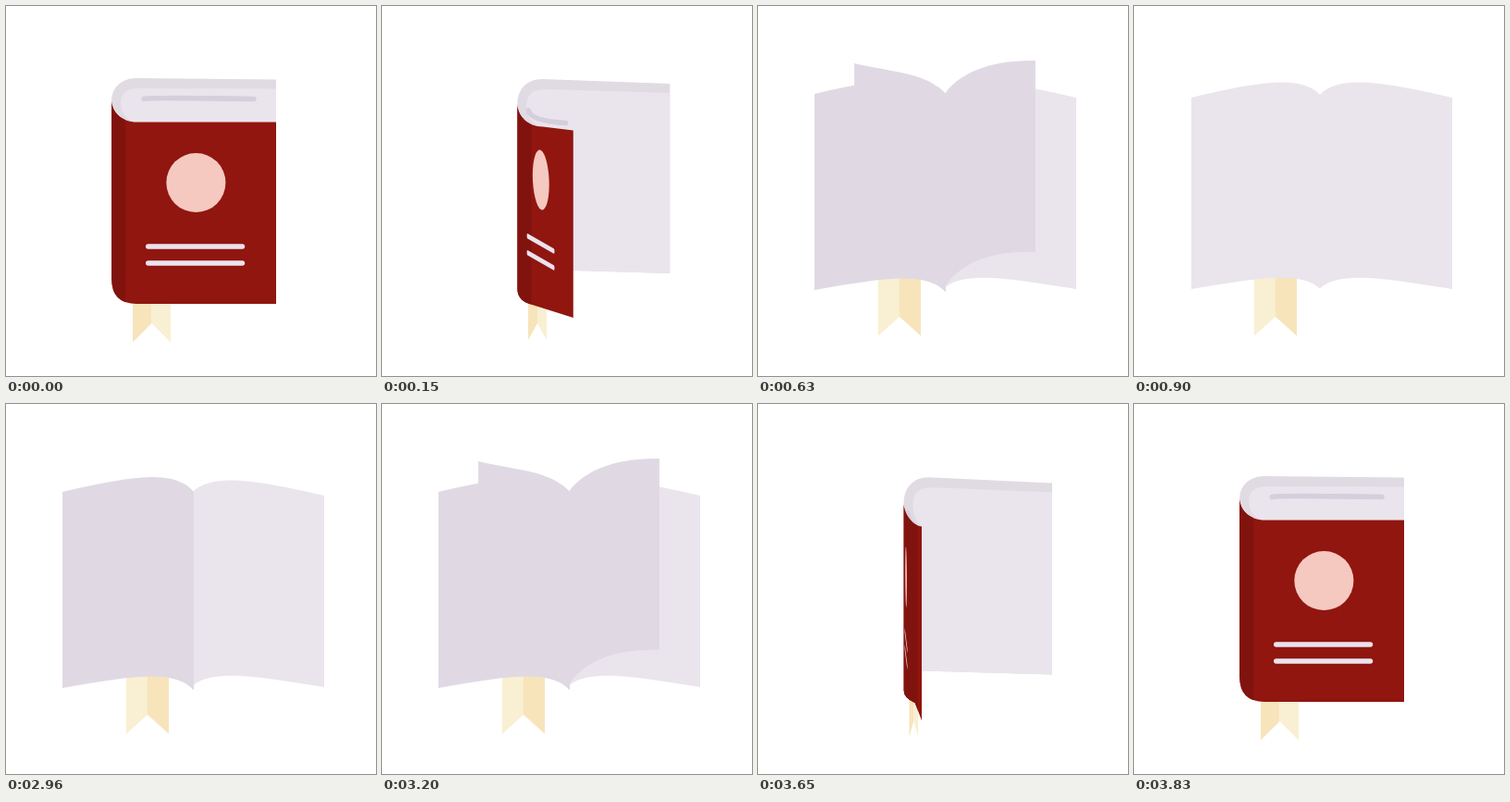
Animation, 400 px wide and 400 px high, one loop 4860 ms. Source, as an HTML page with a canvas:

```html
<!DOCTYPE html>
<html lang="en">
<head>
<meta charset="utf-8">
<title>Opening book</title>
<style>
  html, body { margin: 0; height: 100%; overflow: hidden; background: #fff; }
  canvas { display: block; width: 400px; height: 400px; }
</style>
</head>
<body>
<canvas id="stage" width="400" height="400"></canvas>
<script>
const ctx = document.getElementById('stage').getContext('2d');

const LOOP = 4860, STEP = 30, OPENED = 900, CLOSED_AGAIN = 3830;
const TURN_TIME = 360, LEAVES = 4, FIRST_LEAF = 150, LEAF_GAP = 120;
const HALF_TURN = 0.371;      // progress at which the half-open pose is reached
const PAGE = '#eae5ec', LEAF = '#e0d9e4', BLOCK = '#e0dbe3', MARK = '#d5cedc';
const RED = '#90160f', SPINE_RED = '#81130e', PINK = '#f5c8c0';
const RIBBON_DARK = '#f7e4bb', RIBBON_LIGHT = '#f9efd2';

const ease = k => (1 - Math.cos(Math.PI * Math.min(1, Math.max(0, k)))) / 2;

// Parabola through the closed, half-open and open values
function through(closed, half, open, e) {
  const h = HALF_TURN;
  return closed * (e - h) * (e - 1) / h
       + half * e * (e - 1) / (h * (h - 1))
       + open * e * (e - h) / (1 - h);
}

function fill(color) {
  ctx.fillStyle = color;
  ctx.fill();
}

function stroke(color, width) {
  ctx.strokeStyle = color;
  ctx.lineWidth = width;
  ctx.stroke();
}

// A curved page hinged at the gutter: angle 0 lies right, PI lies left.
// settle (0..1) swells the page slightly as it lands.
function drawPage(color, angle, { gutter = 201, width = 1, drop = 0, settle = 0 } = {}) {
  const c = Math.cos(angle), s = Math.max(0, Math.sin(angle)) ** 1.3;
  const hingeX = gutter + 2 * settle, hingeY = 96 - settle;
  const lift = hingeY - 3 * settle;
  const x1 = hingeX + 21 * c * width, y1 = lift - 22;
  const x2 = hingeX + 67 * c * width, y2 = lift - 14 - (25.5 + 17 * c) * s + drop / 2;
  const tipX = hingeX + (141 + 2 * c - 4 * s + 3 * settle) * c * width;
  const tipY = lift + 3 - (60 + 4 * c) * s + drop;
  const height = 207 + 5 * settle, bend = 212 - 9 * s + 4 * settle;

  ctx.beginPath();
  ctx.moveTo(hingeX, hingeY);
  ctx.bezierCurveTo(x1, y1, x2, y2, tipX, tipY);
  ctx.lineTo(tipX, tipY + height);
  ctx.bezierCurveTo(x2, y2 + bend, x1, y1 + bend, hingeX, hingeY + height + 2.5);
  fill(color);
}

function drawLeaves(time, gutter) {
  if (time >= OPENED) return;
  for (let i = 0; i < LEAVES; i++) {
    const s = (time - FIRST_LEAF - i * LEAF_GAP) / TURN_TIME;
    if (s <= 0 || s > 1) continue;
    const angle = Math.PI * ease(s);
    drawPage(LEAF, angle, { gutter, settle: Math.max(0, -Math.cos(angle)) ** 6 });
  }
}

function drawRibbon(e) {
  const dark = through(137, 158, 176, e), light = through(178, 178, 130, e);
  const middle = (dark + light) / 2;
  const bottom = through(363.5, 361, 356.5, e), notch = through(343, 343, 336, e);
  for (const [color, x] of [[RIBBON_DARK, dark], [RIBBON_LIGHT, light]]) {
    ctx.beginPath();
    ctx.moveTo(x, 290);
    ctx.lineTo(middle, 290);
    ctx.lineTo(middle, notch);
    ctx.lineTo(x, bottom);
    fill(color);
  }
}

// Book seen from the front, the cover narrowing as it swings towards the viewer
function drawFront(e, spine, coverEdge, pageEdge) {
  const p = e / HALF_TURN;
  const span = coverEdge - spine, corner = Math.min(27.5, span);
  const shoulderY = 102 + 4 * p, lipY = 125.5 + 5 * p, edgeY = 125.5 + 9 * p;
  const topY = 78 + p, pageTop = 79.5 + 4.5 * p;

  const lip = inset => {
    ctx.bezierCurveTo(spine + inset, shoulderY + 13, spine + 11.5 + inset / 2, lipY,
      spine + corner, lipY);
    ctx.lineTo(coverEdge, edgeY);
  };
  const block = (color, inset) => {
    const y = topY + 1.1 * inset;
    ctx.beginPath();
    ctx.moveTo(pageEdge, pageTop + inset);
    ctx.lineTo(spine + 27 + inset / 2, y);
    ctx.bezierCurveTo(spine + 10 + inset / 2, y, spine + inset, y + 11 - inset / 2,
      spine + inset, shoulderY + inset / 3);
    lip(inset);
    ctx.lineTo(coverEdge, 279 + 7 * p);
    ctx.lineTo(pageEdge, 279 + 10 * p);
    fill(color);
  };
  block(BLOCK, 0);
  block(PAGE, 10);

  const scale = span / 177.5, markX = spine + 35 * scale, markY = 100.5 + 26 * p;
  ctx.lineCap = 'round';
  ctx.beginPath();
  ctx.moveTo(markX, 100.5 + 12.5 * p);
  ctx.quadraticCurveTo(markX + 3, markY - 2, spine + 153.5 * scale, markY);
  stroke(MARK, 5.5);

  ctx.save();
  ctx.beginPath();
  ctx.moveTo(spine, shoulderY);
  lip(0);
  ctx.lineTo(coverEdge, 322 + 15 * p);
  const radius = Math.min(27 - 11 * p, span);
  ctx.lineTo(spine + radius, 322 + p);
  ctx.quadraticCurveTo(spine, 322 - 3 * p, spine, 322 - radius);
  ctx.closePath();
  fill(RED);
  ctx.clip();
  ctx.fillStyle = SPINE_RED;
  ctx.fillRect(spine - 1, 90, 16, 260);

  // Emblem and title lines share the skew of the cover
  const squeeze = (span - 15) / 162.5, skew = 0.158 * p;
  ctx.transform(squeeze, skew, 0, 1, spine, -110 * skew);
  ctx.beginPath();
  ctx.arc(91, 191, 32, 0, 2 * Math.PI);
  fill(PINK);
  for (const y of [260, 278]) {
    ctx.beginPath();
    ctx.moveTo(39.5, y);
    ctx.lineTo(141, y);
    stroke('#eae3ee', 5.5);
  }
  ctx.restore();
}

function drawInside(e, time, spine, coverEdge, pageEdge) {
  drawPage(PAGE, 0, {
    gutter: spine, width: (pageEdge - spine) / 143, drop: through(-20, -15, 0, e)
  });
  drawPage(PAGE, Math.PI, {
    gutter: spine, width: (spine - coverEdge) / 139, drop: through(26.5, 35.5, 0, e)
  });
  drawLeaves(time, spine);
}

// Opening runs forward, the pause holds, closing replays the opening backwards
function bookTime(t) {
  const forward = Math.floor(t / STEP) * STEP;
  const backward = Math.ceil((CLOSED_AGAIN - t) / STEP) * STEP;
  return Math.max(0, Math.min(forward, backward, OPENED));
}

function render() {
  const time = bookTime(performance.now() % LOOP);
  const e = ease(time / TURN_TIME);
  const spine = 114.2 + 86.8 * e, coverEdge = 292 - 230 * e, pageEdge = 292 + 52 * e;
  ctx.clearRect(0, 0, 400, 400);
  drawRibbon(e);
  if (coverEdge > spine + 15) drawFront(e, spine, coverEdge, pageEdge);
  else drawInside(e, time, spine, coverEdge, pageEdge);
  requestAnimationFrame(render);
}
render();
</script>
</body>
</html>
```
